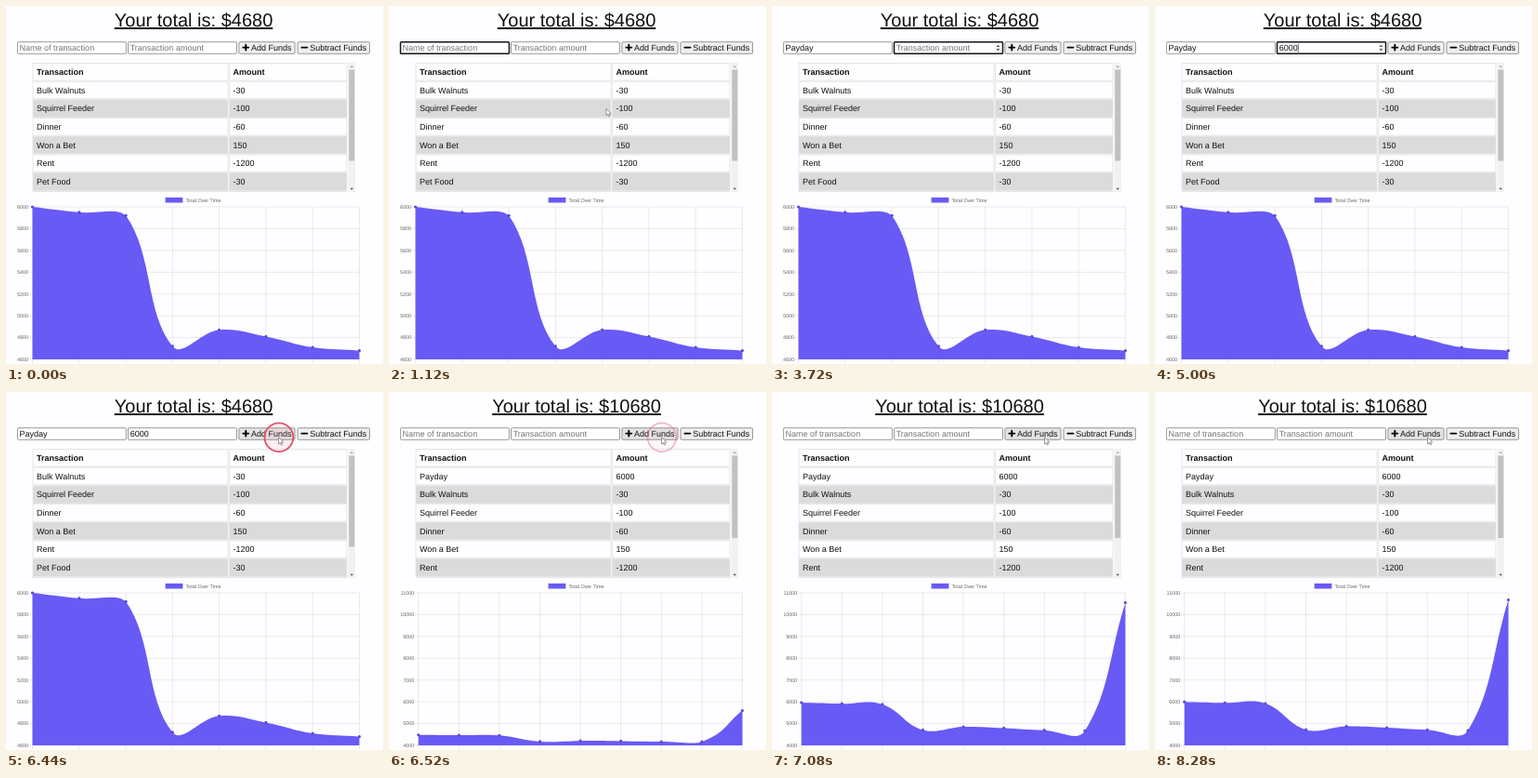
Recreate the animation shown at these times as an HTML page. Size 406 by 385 pixels, loop 8.48 s.

```html
<!DOCTYPE html>
<html lang="en">
<head>
<meta charset="utf-8">
<title>Budget tracker</title>
<style>
  html, body { margin: 0; width: 100%; height: 100%; overflow: hidden; background: #fefdff; }
  svg { display: block; width: 406px; height: 385px; font: 9px "Liberation Sans", Arial, sans-serif; text-rendering: geometricPrecision; }
</style>
</head>
<body>
<svg id="stage" viewBox="0 0 406 385"></svg>
<script>
const LOOP = 8480;
const PURPLE = '#685af5';
const stage = document.getElementById('stage');

function add(tag, attrs = {}, parent = stage) {
  const el = document.createElementNS('http://www.w3.org/2000/svg', tag);
  set(el, attrs);
  parent.appendChild(el);
  return el;
}
function set(el, attrs) {
  for (const key in attrs) el.setAttribute(key, attrs[key]);
}
function label(x, y, text, attrs = {}, parent = stage) {
  const el = add('text', { x, y, fill: '#111', ...attrs }, parent);
  el.textContent = text;
  return el;
}
function box(x, y, width, height, attrs = {}, parent = stage) {
  return add('rect', { x, y, width, height, ...attrs }, parent);
}
const show = (el, on) => el.setAttribute('visibility', on ? 'visible' : 'hidden');
const clamp = (v, lo, hi) => Math.min(hi, Math.max(lo, v));

// Timeline, in ms
const NAME_FOCUS = 560, NAME_TYPING = 2000, AMOUNT_FOCUS = 3160, AMOUNT_TYPING = 4280;
const PRESS = 6360, SUBMIT = 6455, CHART_TIME = 1000, BLINK = 530;

// Heading
const title = label(202, 22, '', { 'font-size': 20, 'text-anchor': 'middle', 'text-decoration': 'underline' });

// Form
function makeField(x, width, placeholder, spinner) {
  const frame = box(x, 38.7, width, 12.6, { fill: '#fff', rx: 0.8 });
  const text = label(x + 2.2, 48.1, placeholder);
  const caret = box(0, 40.5, 0.6, 9.5, { fill: '#000' });
  const arrows = add('g');
  if (spinner) {
    box(x + width - 8, 40.5, 6, 9, { fill: '#f0f0f0' }, arrows);
    add('path', { d: `M${x + width - 6.8} 44l1.8-2.2 1.8 2.2zm0 2h3.6l-1.8 2.2z`, fill: '#555' }, arrows);
  }
  return (value, focused, caretOn) => {
    set(frame, { stroke: focused ? '#151515' : '#777', 'stroke-width': focused ? 1.5 : 0.75 });
    text.textContent = value || placeholder;
    set(text, { fill: value ? '#111' : '#757575' });
    const end = value ? text.getComputedTextLength() : 0;
    set(caret, { x: x + 2.3 + end });
    show(caret, focused && caretOn);
    show(arrows, focused);
  };
}
function makeButton(x, width, text, plus) {
  const frame = box(x, 38.7, width, 12.6, { rx: 1.2, stroke: '#777', 'stroke-width': 0.75, fill: '#efefef' });
  const cx = x + 7.4;
  add('path', {
    d: `M${cx - 3} 44.6h6` + (plus ? `M${cx} 41.6v6` : ''),
    stroke: '#000', 'stroke-width': 1.9, 'stroke-linecap': 'round'
  });
  label(x + 13.2, 48.1, text);
  return frame;
}
const nameField = makeField(12.4, 117, 'Name of transaction', false);
const amountField = makeField(131.5, 117, 'Transaction amount', true);
const addButton = makeButton(250.9, 60.2, 'Add Funds', true);
makeButton(314, 77.6, 'Subtract Funds', false);

// Table
const history = [['Bulk Walnuts', '-30'], ['Squirrel Feeder', '-100'], ['Dinner', '-60'],
  ['Won a Bet', '150'], ['Rent', '-1200'], ['Pet Food', '-30'], ['', '']];
const clip = add('clipPath', { id: 'tableClip' }, add('defs'));
box(28, 60.5, 349, 140, {}, clip);
const table = add('g', { 'clip-path': 'url(#tableClip)' });

const rows = Array.from({ length: 8 }, (_, i) => {
  const top = 61.5 + 19.7 * i;
  const bold = { 'font-weight': i ? 'normal' : 'bold' };
  const style = { fill: i && i % 2 === 0 ? '#dbdbdc' : '#fefdff', stroke: '#e2e1e4', 'stroke-width': 0.8 };
  return [[29, 210], [240.6, 126.4]].map(([x, width]) => {
    box(x, top, width, 18.6, style, table);
    return label(x + 4, top + 12.3, '', bold, table);
  });
});
box(368.6, 61, 7.4, 139.5, { fill: '#f1f1f1' }, table);
const thumb = box(369.3, 68.5, 6, 98, { fill: '#c1c1c1' }, table);
add('path', { d: 'M370.6 66l1.7-2 1.7 2z', fill: '#a3a3a3' }, table);
add('path', { d: 'M370.6 195.8h3.4l-1.7 2z', fill: '#505050' }, table);

function fillTable(entries) {
  [['Transaction', 'Amount'], ...entries].slice(0, 8).forEach((entry, i) =>
    rows[i].forEach((cell, k) => { cell.textContent = entry[k]; }));
}

// Chart
const TOP = 216, BOTTOM = 380, RIGHT = 380.5;
const small = { 'font-size': 5.45, fill: '#666' };
box(171.6, 205.9, 18.8, 5.6, { fill: PURPLE });
label(193.4, 210.6, 'Total Over Time', small);

function controls(prev, cur, next) {
  const before = Math.hypot(cur.x - prev.x, cur.y - prev.y);
  const after = Math.hypot(next.x - cur.x, next.y - cur.y);
  const at = (sign, length) => {
    const f = sign * 0.4 * length / (before + after);
    return {
      x: cur.x + f * (next.x - prev.x),
      y: clamp(cur.y + f * (next.y - prev.y), TOP, BOTTOM)
    };
  };
  return { in: at(-1, before), out: at(1, after) };
}

function makeChart(totals, left, min, max, step) {
  const group = add('g');
  const gap = (RIGHT - left) / (totals.length - 1);
  const yOf = v => BOTTOM - (v - min) / (max - min) * (BOTTOM - TOP);
  const points = totals.map((v, i) => ({ x: left + gap * i, y: yOf(v) }));
  let grid = points.map(p => `M${p.x} ${TOP}V384.5`).join('');
  for (let v = min; v <= max; v += step) {
    grid += `M${left - 4} ${yOf(v)}H${RIGHT}`;
    label(left - 4.4, yOf(v) + 1.9, v, { ...small, 'text-anchor': 'end' }, group);
  }
  add('path', { d: grid, stroke: '#000', 'stroke-opacity': 0.12, 'stroke-width': 0.7, fill: 'none' }, group);
  const area = add('path', { fill: PURPLE }, group);
  const dots = points.map(p => add('circle', { cx: p.x, r: 1.6, fill: '#5a4cd6' }, group));
  const bends = points.map((p, i) => controls(points[i - 1] || p, p, points[i + 1] || p));

  return (visible, grow) => {
    show(group, visible);
    if (!visible) return;
    const lift = y => BOTTOM - (BOTTOM - y) * grow;
    const pair = p => `${p.x.toFixed(2)} ${lift(p.y).toFixed(2)}`;
    let d = `M${left} ${BOTTOM}L${pair(points[0])}`;
    for (let i = 1; i < points.length; i++) {
      d += `C${pair(bends[i - 1].out)} ${pair(bends[i].in)} ${pair(points[i])}`;
    }
    set(area, { d: d + `V${BOTTOM}Z` });
    dots.forEach((dot, i) => set(dot, { cy: lift(points[i].y) }));
  };
}
const totals = [6000, 5950, 5920, 4720, 4870, 4810, 4710, 4680];
const chartBefore = makeChart(totals, 28.5, 4600, 6000, 200);
const chartAfter = makeChart([...totals, 10680], 31.7, 4000, 11000, 1000);

// Pointer and click ring
const ring = add('circle', { fill: '#f08a9a', 'fill-opacity': 0.12, stroke: '#dc5468', 'stroke-width': 1.8 });
const pointer = add('path', {
  d: 'M0 0V7.2L1.7 5.7 2.8 8.2 4 7.7 2.9 5.3H5.2Z',
  fill: '#fff', stroke: '#555', 'stroke-width': 0.6, 'stroke-linejoin': 'round'
});
const route = [[200, 234, 110.5], [500, 85, 45], [680, 85, 45], [1060, 234, 110.5],
  [5700, 234, 110.5], [6200, 293.6, 48.8], [LOOP, 293.6, 48.8]];

function pointerAt(t) {
  const i = Math.max(1, route.findIndex(stop => t < stop[0]));
  const [t0, x0, y0] = route[i - 1], [t1, x1, y1] = route[i];
  const k = clamp((t - t0) / (t1 - t0), 0, 1);
  const ease = k * k * (3 - 2 * k);
  return [x0 + (x1 - x0) * ease, y0 + (y1 - y0) * ease];
}
function drawPointer(t) {
  const [x, y] = pointerAt(t);
  set(pointer, { transform: `translate(${x} ${y})` });
  show(pointer, (t >= 200 && t < NAME_TYPING) || t >= 5700);
  const start = t < 3000 ? NAME_FOCUS - 20 : PRESS;
  const age = t - start;
  show(ring, age >= 0 && age < 200);
  set(ring, { cx: x + 0.3, cy: y, r: 10 + 5.4 * clamp(age / 80, 0, 1), opacity: clamp((200 - age) / 100, 0, 1) });
}

const typed = (text, t, start, pace) => text.slice(0, clamp(Math.floor((t - start) / pace) + 1, 0, text.length));

// The caret blink restarts with focus and with every key
function caretOn(t, focus, typing, end) {
  const since = t < typing ? focus : Math.min(t, end);
  return Math.floor((t - since) / BLINK) % 2 === 0;
}

let submitted = null;
function draw(t) {
  const done = t >= SUBMIT;
  if (done !== submitted) {
    submitted = done;
    title.textContent = 'Your total is: $' + (done ? 10680 : 4680);
    fillTable(done ? [['Payday', '6000'], ...history] : history);
    set(thumb, { height: done ? 88.5 : 98 });
  }
  nameField(done ? '' : typed('Payday', t, NAME_TYPING, 120),
    t >= NAME_FOCUS && t < AMOUNT_FOCUS, caretOn(t, NAME_FOCUS, NAME_TYPING, 2600));
  amountField(done ? '' : typed('6000', t, AMOUNT_TYPING, 145),
    t >= AMOUNT_FOCUS && t < PRESS, caretOn(t, AMOUNT_FOCUS, AMOUNT_TYPING, 4715));
  set(addButton, { fill: t > 6100 ? '#e3e3e4' : '#efefef' });

  const k = clamp((t - SUBMIT) / CHART_TIME, 0, 1);
  chartBefore(!done, 1);
  chartAfter(done, 1 - (1 - k) ** 4);
  drawPointer(t);
}

const begin = performance.now();
function tick() {
  draw((performance.now() - begin) % LOOP);
  requestAnimationFrame(tick);
}
tick();
</script>
</body>
</html>
```
